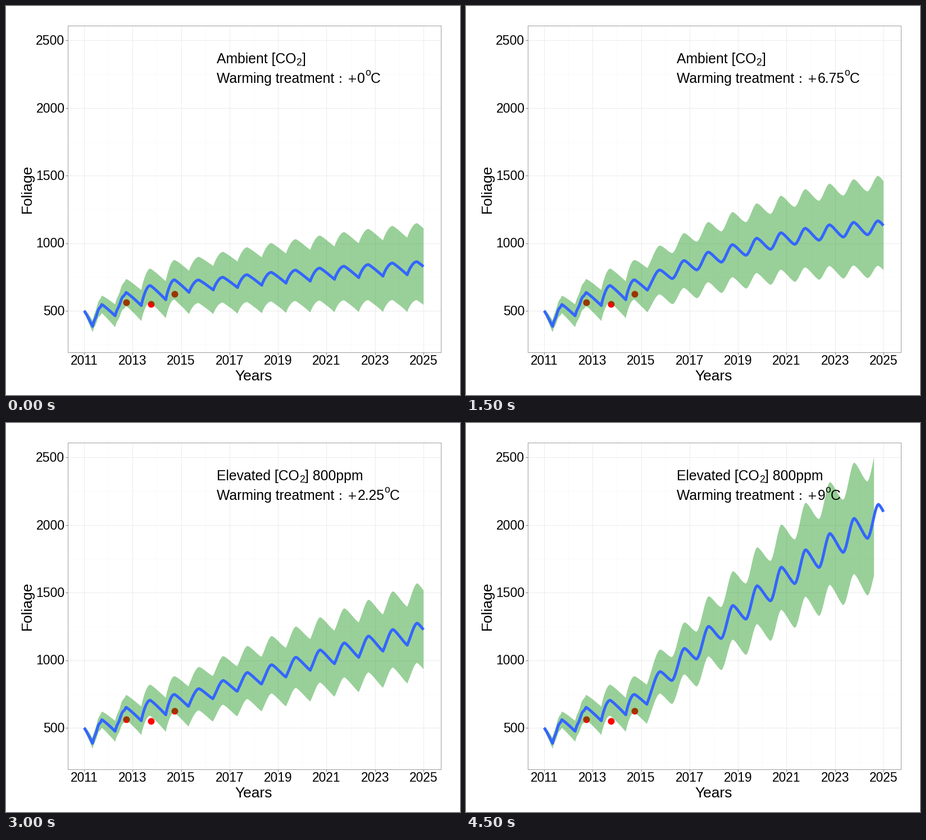
A matplotlib script that plays this animation: 808 px wide and 693 px high, repeating every 5000 ms.

```python
import numpy as np
import matplotlib.pyplot as plt
from matplotlib.animation import FuncAnimation

W, H, DPI = 808, 693, 64
PT = 72 / DPI  # points per pixel
plt.rcParams["font.family"] = "Liberation Sans"

WARMING = ["0", "2.25", "4.5", "6.75", "9"]
T = np.linspace(2011, 2025, 1401)

# first, last: peak in 2015 and 2024 as base + rate * warming ** power
# bend: curvature of the trend; fan, flare: how the band widens
AMBIENT = dict(first=(728, 48.6, 0.22), last=(863, 90.7, 0.63),
               bend=(0.38, 0.065), fan=7, flare=(0.75, 0))
ELEVATED = dict(first=(766, 7.7, 1.35), last=(1046, 90.3, 1.14),
                bend=(0.1, 0.02), fan=22, flare=(0.7, 0.04))


def px(year):
    return 139 + (np.asarray(year) - 2011) * 604 / 14


def py(value):
    return 543 - (np.asarray(value) - 500) * 0.241


def grown(law, warm):
    base, rate, power = law
    return base + rate * warm ** power


def linear(law, warm):
    return law[0] + law[1] * warm


def peak(year, level, warm, sway):
    if year < 2015:
        settled = 738 + 9 * sway
        return settled * (0.75 + 0.25 * ((year - 2011) / 3) ** 0.65)
    s = (year - 2015) / 9
    s += linear(level["bend"], warm) * s * (1 - s)
    first, last = grown(level["first"], warm), grown(level["last"], warm)
    return first + (last - first) * s


def low_date(year, warm):
    if year < 2015:
        return year + (0.35, 0.28, 0.36, 0.37)[year - 2011]
    return year + 0.33 - 0.01 * warm * max(0, 1 - (year - 2015) / 5)


def turning_points(level, warm, sway):
    """Each winter sheds a share of the last peak, each summer regrows."""
    pts = [(2011, 500), (low_date(2011, warm), 385)]
    for year in range(2011, 2025):
        top = peak(year, level, warm, sway)
        late = 0.73 + 0.01 * warm * (year > 2014) * 0.75
        pts.append((year + late, top))
        loss = np.interp(year, [2013, 2015], [0.153, 0.102])
        loss -= 0.0033 * warm * (year > 2013)
        pts.append((low_date(year + 1, warm), top * (1 - loss)))
    return pts


def rise(u, year, soft):
    ease = np.sin(np.pi / 2 * u)
    if year < 2013:
        return (u + ease) / 2 + 0.03 * np.sin(4 * np.pi * u)
    return (1 - soft) * ease ** 0.85 + soft * u * u * (3 - 2 * u)


def fall(u, soft):
    smooth = u * u * (3 - 2 * u)
    return (1 - soft) * u ** 1.12 + soft * (u + smooth) / 2


def mean_curve(pts, warm):
    y = np.empty_like(T)
    for (t0, v0), (t1, v1) in zip(pts, pts[1:]):
        seg = (T >= t0) & (T <= t1)
        u = (T[seg] - t0) / (t1 - t0)
        soft = min(1, warm / 4.5) * np.clip((t0 - 2014.5) / 1.5, 0, 1)
        shape = rise(u, int(t0), soft) if v1 > v0 else fall(u, soft)
        y[seg] = v0 + (v1 - v0) * shape
    return y


def half_width(level, warm, sway):
    inner = 141 - 6 * sway
    outer = 265 + level["fan"] * warm - 20 * sway
    early = np.sqrt(np.clip((T - 2011) / 3.75, 0, 1))
    late = np.clip((T - 2014.75) / 10, 0, 1) ** linear(level["flare"], warm)
    pulse = 0.99 + 0.01 * np.cos(2 * np.pi * (T - 0.75))
    return (inner * early + (outer - inner) * late) * pulse


def scenario(i):
    level = AMBIENT if i < 5 else ELEVATED
    warm = float(WARMING[i % 5])
    sway = 1 if i % 4 in (1, 2) else -1  # spread between runs
    mean = mean_curve(turning_points(level, warm, sway), warm)
    half = half_width(level, warm, sway)
    # the band stops where it leaves the value range
    over = np.flatnonzero(mean + half > 2500)
    end = over[0] if len(over) else len(T)
    x = px(T[:end])
    upper, lower = py((mean + half)[:end]), py((mean - half)[:end])
    band = np.column_stack([np.r_[x, x[::-1]], np.r_[upper, lower[::-1]]])
    return py(mean), band


SCENES = [scenario(i) for i in range(10)]

fig = plt.figure(figsize=(W / DPI, H / DPI), dpi=DPI, facecolor="white")
ax = fig.add_axes([0, 0, 1, 1])
ax.set_xlim(0, W)
ax.set_ylim(H, 0)
ax.axis("off")

L, R, TOP, BOT = 109.5, 773.5, 34.5, 616.5


def rule(x, y, color, width=1.0, z=1):
    ax.plot(x, y, color=color, lw=width * PT, zorder=z, solid_capstyle="butt")


def label(x, y, text, size, **kw):
    return ax.text(x, y, text, fontsize=size * PT, va="baseline",
                   color="black", zorder=8, **kw)


for year in range(2012, 2025, 2):
    rule([px(year)] * 2, [TOP, BOT], "#fafafa")
for value in range(250, 2500, 500):
    rule([L, R], [py(value)] * 2, "#fafafa")
for year in range(2011, 2026, 2):
    rule([px(year)] * 2, [TOP, BOT], "#ebebeb")
    rule([px(year)] * 2, [BOT, BOT + 4], "#7f7f7f")
    label(px(year), 639, str(year), 22.8, ha="center")
for value in range(500, 2501, 500):
    rule([L, R], [py(value)] * 2, "#ebebeb")
    rule([L - 4, L], [py(value)] * 2, "#7f7f7f")
    label(104.5, py(value) + 8, str(value), 23, ha="right")
rule([L, R, R, L, L], [TOP, TOP, BOT, BOT, TOP], "#9c9c9c", z=7)

label(440.5, 667, "Years", 26.4, ha="center")
label(45, 325.5, "Foliage", 26.4, ha="center", rotation=90, rotation_mode="anchor")

ax.plot([214, 257.5, 300], [527.5, 530.5, 513], "o", color="red",
        ms=12 * PT, mew=0, zorder=3)
band, = ax.fill([0, 0, 0], [0, 0, 0], color="#008b00", alpha=0.4, lw=0, zorder=4)
line, = ax.plot([], [], color="#3366ff", lw=5 * PT, zorder=5,
                solid_capstyle="butt", solid_joinstyle="round")

EM = 24.7
head = label(375, 102, "", EM)
sub = label(0, 106, "2", 17.5)
tail = label(0, 102, "", EM)
label(375, 137, "Warming treatment", EM)
label(592.5, 137, ":", EM, family="Liberation Serif")
rule([609.5, 623], [129.5, 129.5], "black", 1.5, z=8)
rule([616.2, 616.2], [123, 136], "black", 1.5, z=8)
number = label(625.5, 137, "", EM)
degree = label(0, 124, "o", 17.5)
unit = label(0, 137, "C", EM)


def update(i):
    y, outline = SCENES[i]
    line.set_data(px(T), y)
    band.set_xy(outline)
    if i < 5:
        head.set_text("Ambient [CO")
        tail.set_text("]")
        x = 516.5
    else:
        head.set_text("Elevated [CO")
        tail.set_text("] 800ppm")
        x = 522.5
    sub.set_x(x)
    tail.set_x(x + 10)
    warm = WARMING[i % 5]
    number.set_text(warm)
    dots = warm.count(".")
    x = 625.5 + EM * (0.556 * (len(warm) - dots) + 0.278 * dots)
    degree.set_x(x)
    unit.set_x(x + 9.5)
    return line, band, head, sub, tail, number, degree, unit


anim = FuncAnimation(fig, update, frames=10, interval=500, repeat=True,
                     repeat_delay=0, blit=False)
plt.show()
```
